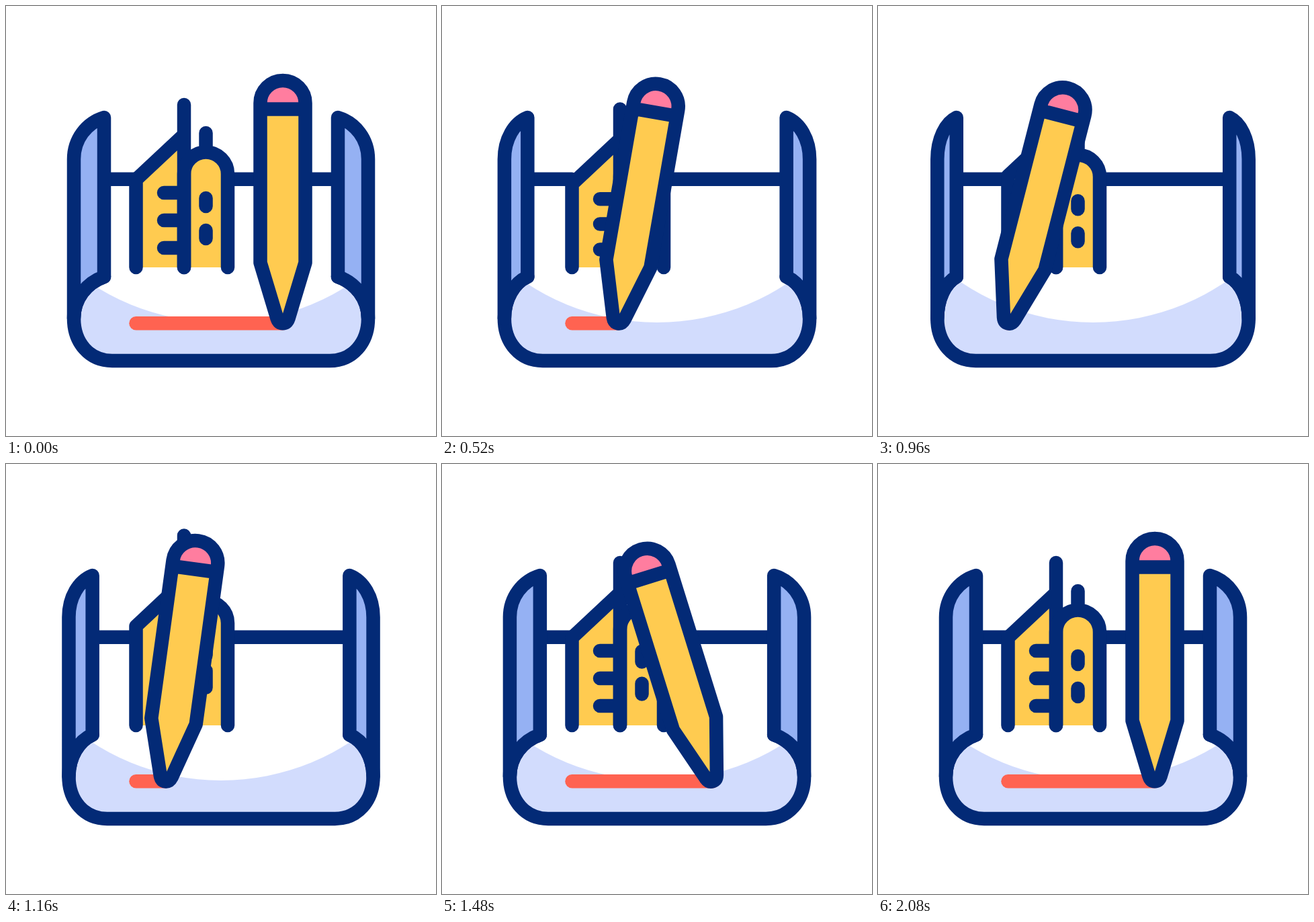
Recreate the animation shown at these times as an HTML page. Size 640x640 px, loop 2200 ms.

```html
<!DOCTYPE html>
<html lang="en">
<head>
<meta charset="utf-8">
<title>Architect drawing</title>
<style>
  html, body { margin: 0; width: 100%; height: 100%; overflow: hidden; background: #fff; }
  svg { display: block; width: 100vw; height: 100vh; }
  .ink { stroke: #032a76; stroke-width: 20.5; stroke-linecap: round; stroke-linejoin: round; fill: none; }
  .yellow { fill: #ffcb50; }
  .blue { fill: #95b1f3; }
</style>
</head>
<body>
<svg viewBox="0 0 640 640">
  <path id="scrollFill" fill="#d2dcfd"/>
  <circle cx="320" cy="119" r="352" fill="#fff"/>
  <path id="backEdge" class="ink"/>
  <path id="scroll" class="ink"/>
  <path id="leftPanel" class="ink blue"/>
  <path id="rightPanel" class="ink blue"/>

  <path id="houseFill" class="yellow"/>
  <path id="towerFill" class="yellow"/>
  <path id="house" class="ink"/>
  <path id="tower" class="ink"/>

  <path id="redLine" fill="none" stroke="#ff6351" stroke-width="20.5" stroke-linecap="round"/>

  <g id="pencil">
    <path class="yellow" d="M-33.5 382V150H33.5V382L8.5 465H-8.5Z"/>
    <path fill="#ff7d9f" d="M-33.5 153.5V144.5A33.5 33.5 0 0 1 33.5 144.5V153.5Z"/>
    <path class="ink" d="M-33.5 382V144.5A33.5 33.5 0 0 1 33.5 144.5V382L8.5 465Q6 472.3 0 472.3Q-6 472.3 -8.5 465ZM-33.5 153.5H33.5"/>
  </g>
</svg>
<script>
const LOOP = 2200, STEP = 40;
const el = id => document.getElementById(id);
const draw = (id, d) => el(id).setAttribute('d', d);

// Ease between two values; slope sets the speed at the start.
const ease = (u, slope = 0) => u * u * (3 - 2 * u) + slope * u * (1 - u) ** 2;

// Keys are [time, value, start slope of the segment that ends here].
function track(t, keys) {
  if (t <= keys[0][0]) return keys[0][1];
  for (let i = 1; i < keys.length; i++) {
    const [t0, v0] = keys[i - 1], [t1, v1, slope] = keys[i];
    if (t < t1) return v0 + (v1 - v0) * ease((t - t0) / (t1 - t0), slope);
  }
  return keys[keys.length - 1][1];
}

const TIP_X = [[200, 412], [730, 193.5, .35], [1004, 193.5], [1547, 412]];
const TILT = [[200, 0], [730, 14.4, .35], [1004, 14.4], [1550, -18.8], [1955, 0]];
const SPREAD = [[200, 0], [865, 13.5, 1], [1505, 0]];
const HOUSE = [[200, 0], [640, 8], [680, 8], [1220, -18], [1470, 0]];
const TOWER = [[360, 0], [760, 12], [800, 12], [1280, -18], [1560, 0]];

// Lift grows faster than the dip for parts that stretch upward.
const stretch = (shift, factor) => shift < 0 ? shift * factor : shift;

function drawPaper(spread) {
  const outer = 101 - spread, inner = 146 - 2.3 * spread;
  const bend = outer + .42 * (inner - outer);
  const panel = x => `M${x(inner)} 166C${x(bend)} 174 ${x(outer)} 198 ${x(outer)} 228V465` +
    `C${x(outer)} 436 ${x(bend)} 412 ${x(inner)} 403Z`;
  const keep = x => x, flip = x => 640 - x;
  const turn = 158 - spread, knee = 124 - spread;
  const scroll = `M${inner} 403C${bend} 412 ${outer} 436 ${outer} 465` +
    `C${outer} 501 ${knee} 528 ${turn} 528H${flip(turn)}` +
    `C${flip(knee)} 528 ${flip(outer)} 501 ${flip(outer)} 465` +
    `C${flip(outer)} 436 ${flip(bend)} 412 ${flip(inner)} 403`;
  draw('scrollFill', scroll + 'Z');
  draw('scroll', scroll);
  draw('backEdge', `M${inner} 257.7H193.5M330 257.7H${flip(inner)}`);
  draw('leftPanel', panel(keep));
  draw('rightPanel', panel(flip));
}

function drawHouse(shift) {
  const roof = `M193.5 389V${258.5 + shift}L265 ${191.5 + shift}`;
  const bars = [[278, 1.4], [319, .85], [360, .4]]
    .map(([y, k]) => `M235 ${y + k * shift}H265`).join('');
  draw('houseFill', roof + 'V389Z');
  draw('house', `${roof}M265 389V${147 + stretch(shift, 2.37)}${bars}`);
}

function drawTower(shift) {
  const top = 250 + shift;
  const dome = `M265 389V${top}A32.5 32.5 0 0 1 330 ${top}V389`;
  const windows = [286, 334]
    .map(y => `M297.5 ${y + stretch(shift, 2)}V${y + 12 + shift}`).join('');
  draw('towerFill', dome + 'Z');
  draw('tower', `${dome}M297.5 ${217 + shift}V${189 + stretch(shift, 2)}${windows}`);
}

function render(t) {
  const tip = track(t, TIP_X);
  drawPaper(track(t, SPREAD));
  drawHouse(track(t, HOUSE));
  drawTower(track(t, TOWER));
  draw('redLine', `M193.5 472.2H${tip + .01}`);
  el('pencil').setAttribute('transform', `translate(${tip} 0) rotate(${track(t, TILT)} 0 472)`);
}

let start;
function tick(now) {
  start ??= now;
  render(Math.floor((now - start) % LOOP / STEP) * STEP);
  requestAnimationFrame(tick);
}
render(0);
requestAnimationFrame(tick);
</script>
</body>
</html>
```
